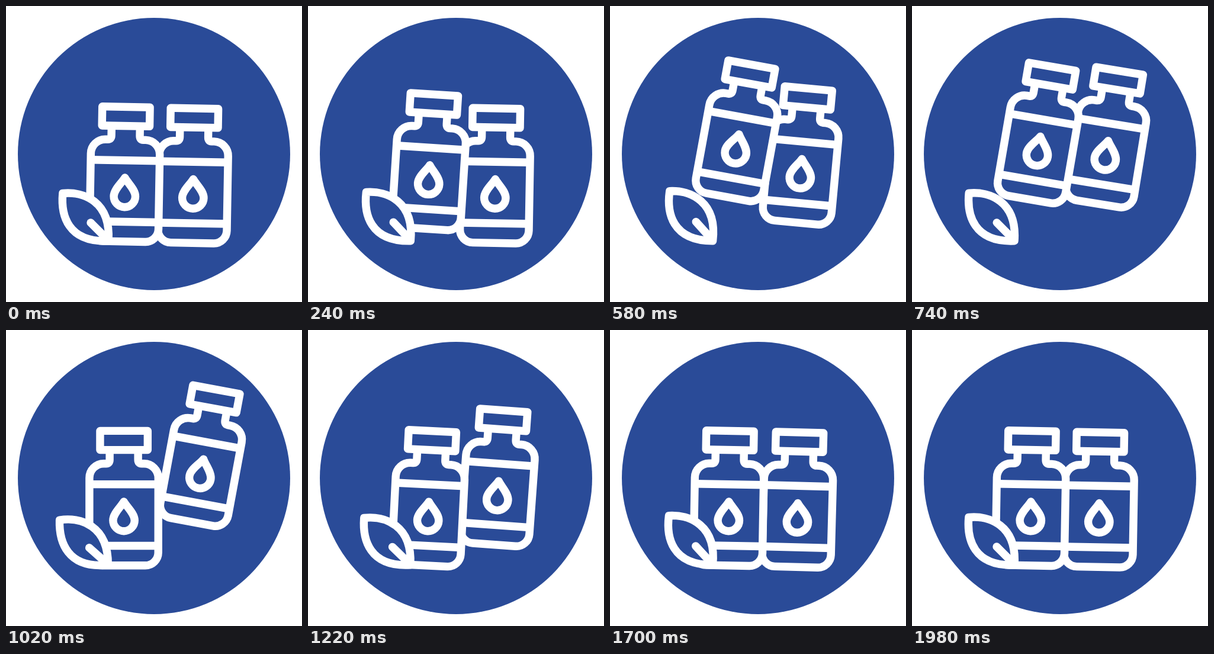
These frames come from a looping animation (500x500 px, 2 s). An HTML page:

```html
<!DOCTYPE html>
<html lang="en">
<head>
<meta charset="utf-8">
<title>Bottles and leaf</title>
<style>
  :root {
    --blue: #2a4b98;
    --rise: cubic-bezier(.33, 1, .67, 1);
    --swing: cubic-bezier(.42, 0, .58, 1);
  }
  html, body { margin: 0; width: 100%; height: 100%; overflow: hidden; background: #fff; }
  svg { display: block; width: 100%; height: 100%; }

  .disc { fill: var(--blue); }
  .line {
    fill: var(--blue);
    stroke: #fff;
    stroke-width: 13.4;
    stroke-linecap: round;
    stroke-linejoin: round;
  }
  .butt { stroke-linecap: butt; }

  .left, .right, .leaf {
    transform-origin: 0 0;
    animation: 2s var(--swing) infinite;
  }
  .left { animation-name: left-lift, left-tilt; }
  .right { animation-name: right-lift, right-tilt; }
  .leaf { animation-name: sway; }

  @keyframes left-lift {
    0%, 7% { translate: 0 0; animation-timing-function: var(--rise); }
    33%, 34% { translate: 0 -76px; }
    51%, 100% { translate: 0 0; }
  }
  @keyframes left-tilt {
    0%, 7% { rotate: 1deg; animation-timing-function: var(--rise); }
    33%, 34% { rotate: 10.5deg; }
    50.5% { rotate: 0deg; }
    57.5% { rotate: 3.2deg; }
    71%, 100% { rotate: 1deg; }
  }
  @keyframes right-lift {
    0%, 22% { translate: 0 0; animation-timing-function: var(--rise); }
    48%, 51.5% { translate: 0 -76px; }
    70.5%, 100% { translate: 0 0; }
  }
  @keyframes right-tilt {
    0%, 22% { rotate: 1deg; animation-timing-function: var(--rise); }
    48%, 51.5% { rotate: 10.5deg; }
    68.5% { rotate: 0deg; }
    75.5% { rotate: 3.2deg; }
    90%, 100% { rotate: 1deg; }
  }
  @keyframes sway {
    0%, 100% { rotate: 0deg; }
    25%, 75% { rotate: 3.4deg; }
    50% { rotate: -3.4deg; }
  }
</style>
</head>
<body>
<svg viewBox="0 0 500 500">
  <defs>
    <!-- Origin sits at the bottle's pivot, near the middle of its base -->
    <g id="bottle" class="line">
      <path class="butt" d="M-24-192V-176Q-24-169.2-30-169.2H-34A24.2 24.2 0 0 0-58.2-145V-19A22 22 0 0 0-36.2 2.8H36.2A22 22 0 0 0 58.2-19V-145A24.2 24.2 0 0 0 34-169.2H30Q24-169.2 24-176V-192"/>
      <path class="butt" d="M-58.2-134.3H58.2M-58.2-30.5H58.2"/>
      <rect x="-40.2" y="-224.6" width="80.4" height="32.2"/>
      <path d="M0-105C5-96 18.2-85 18.2-73.5A18.2 18.2 0 0 1-18.2-73.5C-18.2-85-5-96 0-105Z"/>
    </g>
  </defs>

  <circle class="disc" cx="250" cy="250" r="230"/>

  <g transform="translate(314.5 397.5)">
    <g class="right"><use href="#bottle"/></g>
  </g>
  <g transform="translate(199 395)">
    <g class="left"><use href="#bottle"/></g>
  </g>
  <g transform="translate(172 408)">
    <g class="leaf">
      <g class="line" transform="translate(-172 -408)">
        <path d="M95.8 316.5C131 313 177.5 330 173 396.8C104 400 92.5 353 95.8 316.5Z"/>
        <path d="M143 366L172 395"/>
      </g>
    </g>
  </g>
</svg>
</body>
</html>
```
